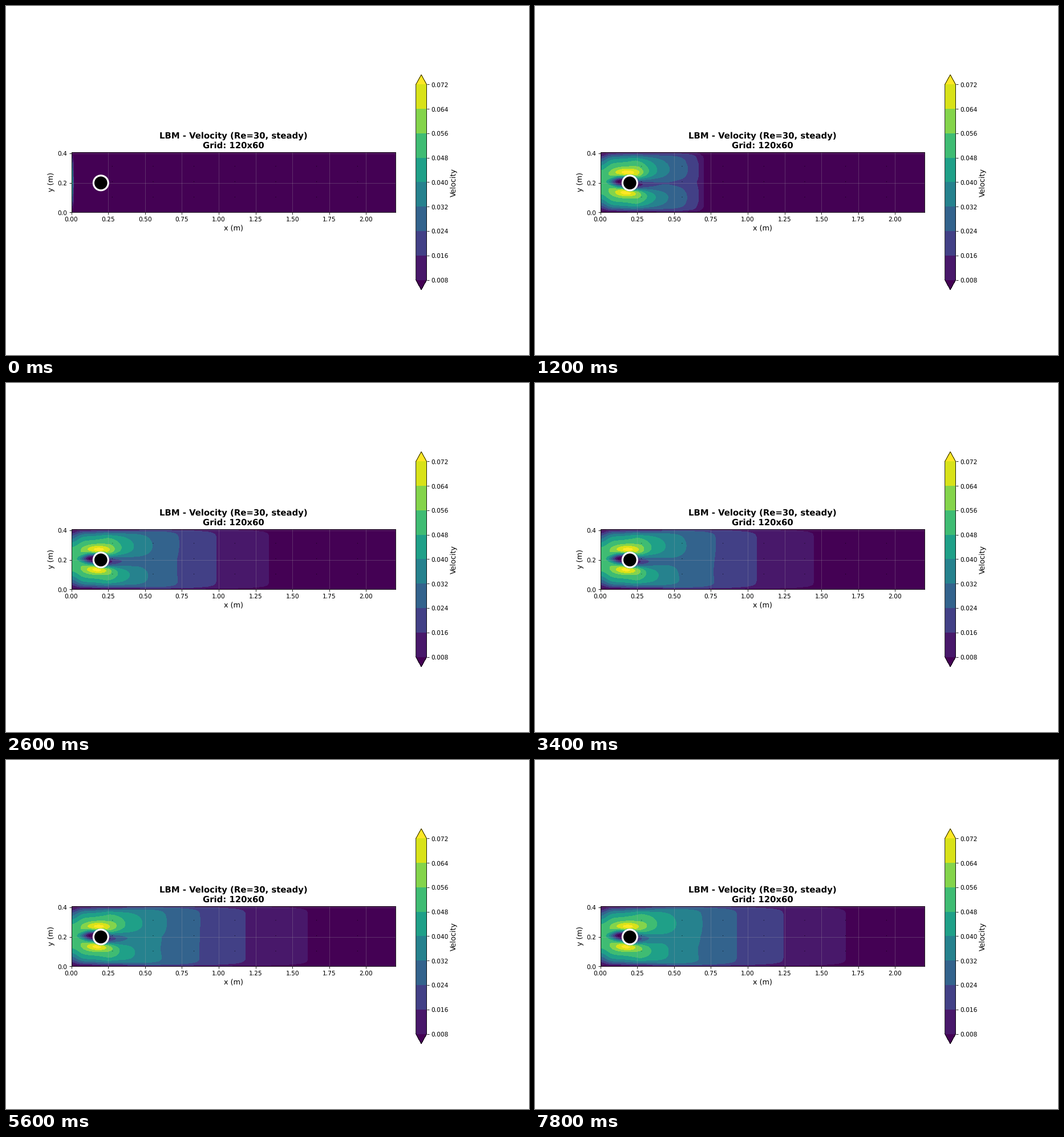
A matplotlib script that plays this animation: 917x611 px, repeating every 8000 ms.

```python
import numpy as np
import matplotlib.pyplot as plt
from matplotlib.animation import FuncAnimation
from matplotlib.patches import Circle

W, H, DPI = 917, 611, 917 / 12
FRAMES, INTERVAL = 40, 200
LENGTH, HEIGHT = 2.2, 0.41
LEVELS = np.linspace(0.008, 0.072, 9)

x, y = np.meshgrid(np.linspace(0, LENGTH, 120), np.linspace(0, HEIGHT, 60))


def bell(v, mid, width):
    return np.exp(-((v - mid) / width) ** 2)


def reach(step):
    """Where the lane speed falls to 0.048, 0.040 ... 0.008."""
    n = np.arange(6)
    near = 0.315 + 0.0018 * step
    far = 1.7 - 1.14 * np.exp(-0.089 * step)
    ratio = 1.46 - 0.003 * step
    spread = near + (far - near) * (ratio ** n - 1) / (ratio ** 5 - 1)
    wave = 0.09 + 0.1015 * step - 0.03 * (5 - n)
    return np.minimum(spread, wave)


def lane_speed(step, pos, top):
    r = reach(step)
    knots = [0, 0.8 * r[0], *r, r[-1] + 0.2]
    speeds = [top, top, *LEVELS[5::-1], 0]
    return np.interp(pos, knots, speeds)


def wake_loss(step):
    """Share of speed lost ahead of and behind the cylinder."""
    ahead = bell(np.minimum(x, 0.14), 0.14, 0.075)
    back = np.clip(x - 0.2, 0, None)
    behind = np.exp(-(back / (0.2 - 0.0018 * step)) ** 1.3)
    loss = np.where(x < 0.2, ahead, behind)
    width = np.where(x < 0.2, 0.02 + 0.015 * ahead, 0.035 + 0.08 * back)
    mid = 0.198 - 0.01 * np.tanh((x - 0.2) / 0.03)
    return loss * bell(y, mid, width)


def velocity(step):
    s = y / HEIGHT
    inlet = 0.0565 * 4 * s * (1 - s)
    if step == 0:
        return np.where(x == 0, inlet, 0)

    # Bend the fronts: rounded lobes, lower lane a little shorter
    lobe = ((np.abs(y - 0.2035) - 0.075) / 0.1) ** 2
    lag = 0.045 * np.clip((step - 9) / 8, 0, 1)
    pos = (x + 0.08 * lobe * bell(x, 0.4, 0.2)
           + lag * bell(y, 0.11, 0.07) * bell(x, 0.5, 0.25))
    top = 0.0555 + 0.004 * max(0, 1 - step / 9)
    base = lane_speed(step, pos, top)

    wall = np.minimum(y, HEIGHT - y)
    layer = 0.009 + 0.031 * bell(x, 0.1, 0.25)
    jets = bell(y, 0.268, 0.03) + bell(y, 0.138, 0.03)
    jets = 0.023 * min(1, step / 3) * jets * bell(x, 0.18, 0.085)
    flow = base * (1 - np.exp(-wall / layer)) + jets * base / top
    # Dip trailing the start-up wave
    flow -= (0.005 * bell(step, 9, 3) * bell(x, 0.088 * step, 0.05)
             * bell(y, 0.2, 0.02))

    mix = bell(x, 0, 0.055)
    u = mix * inlet + (1 - mix) * flow
    r = np.hypot(x - 0.2, y - 0.2)
    skin = 1 - bell(np.maximum(r, 0.045), 0.045, 0.01)
    return u * (1 - wake_loss(step)) * skin


plt.rcParams["text.hinting"] = "none"
fig, ax = plt.subplots(figsize=((W + 0.01) / DPI, (H + 0.01) / DPI), dpi=DPI)
fig.subplots_adjust(bottom=0.1101, top=0.8801)


def fill(u):
    return ax.contourf(x, y, u, levels=LEVELS, cmap="viridis", extend="both")


start = velocity(0)
backdrop = fill(start)
bar = fig.colorbar(backdrop, ax=ax, shrink=0.8, ticks=LEVELS)
bar.set_label("Velocity", fontsize=12)

ax.set_aspect("equal")
ax.set_xlim(0, LENGTH)
ax.set_ylim(0, HEIGHT)
ax.set_yticks([0, 0.2, 0.4])
ax.set_xticks(np.arange(0, 2.1, 0.25))
ax.set_xlabel("x (m)", fontsize=12)
ax.set_ylabel("y (m)", fontsize=12)
ax.set_title("LBM - Velocity (Re=30, steady)\nGrid: 120x60",
             fontsize=14, fontweight="bold")
ax.grid(True, alpha=0.3)
ax.add_patch(Circle((0.2, 0.2), 0.05, facecolor="black", edgecolor="white",
                    linewidth=3, zorder=10))

every = (slice(None, None, 15), slice(None, None, 15))
still = np.zeros_like(x)[every]
arrows = ax.quiver(x[every], y[every], start[every], still, color="black",
                   width=0.002, scale=20, zorder=3)
layers = []


def update(step):
    while layers:
        layers.pop().remove()
    u = velocity(step)
    layers.append(fill(u))
    arrows.set_UVC(u[every], still)
    return []


anim = FuncAnimation(fig, update, frames=FRAMES, init_func=lambda: update(0),
                     interval=INTERVAL, repeat=True, repeat_delay=0, blit=False)
plt.show()
```
